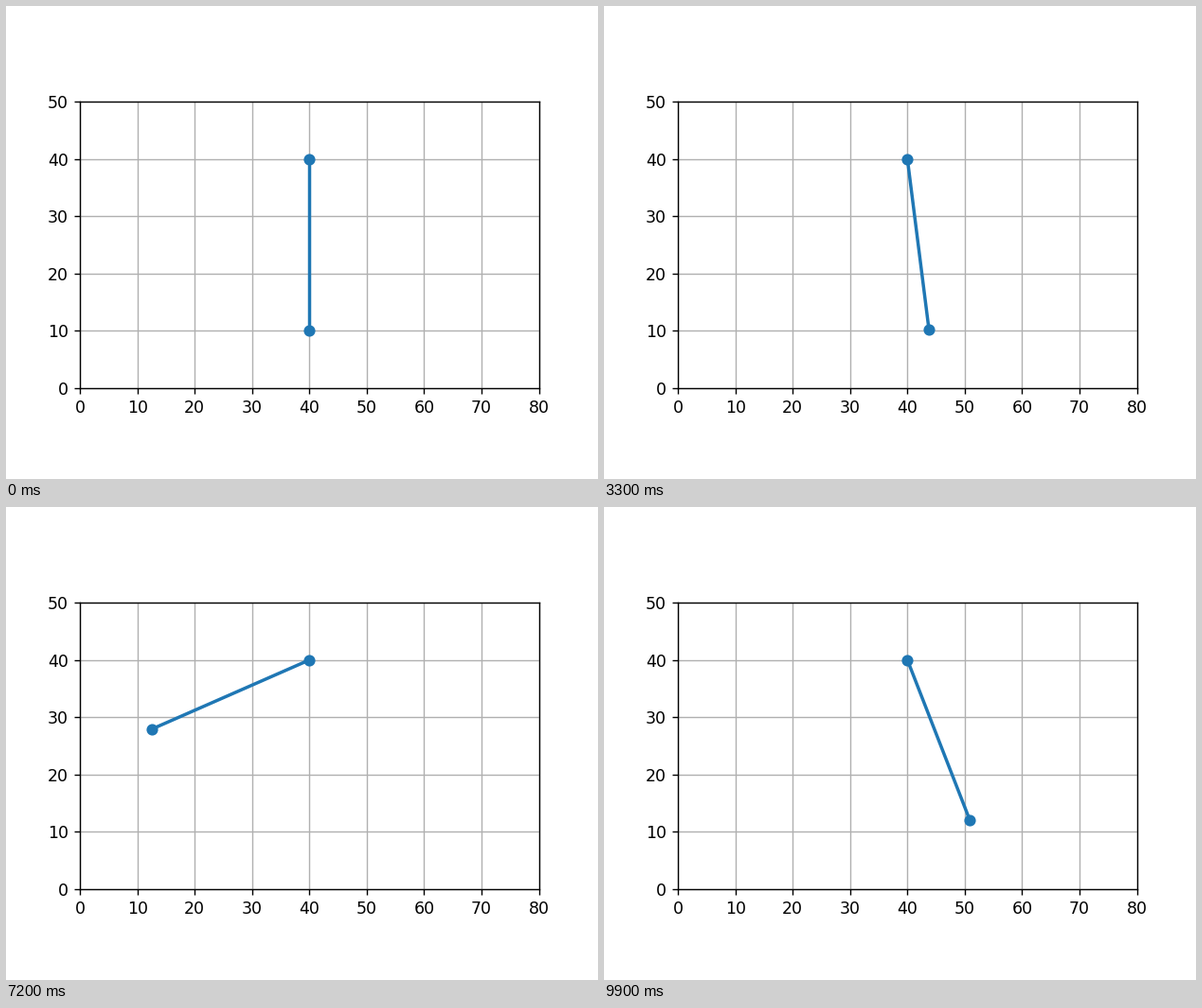
Recreate the animation shown at these times as a matplotlib script. Size 625 px wide and 500 px high, loop 10 s.

```python
import numpy as np
import matplotlib.pyplot as plt
from matplotlib.animation import FuncAnimation

FRAMES = 100
INTERVAL = 100  # ms

PIVOT = np.array([40, 40])
LENGTH = 30
SWING = 1.238              # largest angle, radians
OMEGA = np.sqrt(1 / 12)    # radians per frame

fig, ax = plt.subplots(figsize=(5, 4), dpi=125)
ax.set_aspect("equal")
ax.set_xlim(0, 80)
ax.set_ylim(0, 50)
ax.set_xticks(range(0, 81, 10))
ax.set_yticks(range(0, 51, 10))
ax.grid()

rod, = ax.plot([], [], "o-", lw=2)


def update(i):
    angle = -SWING * np.sin(OMEGA * i)
    bob = PIVOT + LENGTH * np.array([np.sin(angle), -np.cos(angle)])
    rod.set_data(*zip(PIVOT, bob))
    return rod,


anim = FuncAnimation(fig, update, frames=FRAMES, interval=INTERVAL,
                     repeat=True, repeat_delay=0, blit=False)

plt.show()
```
